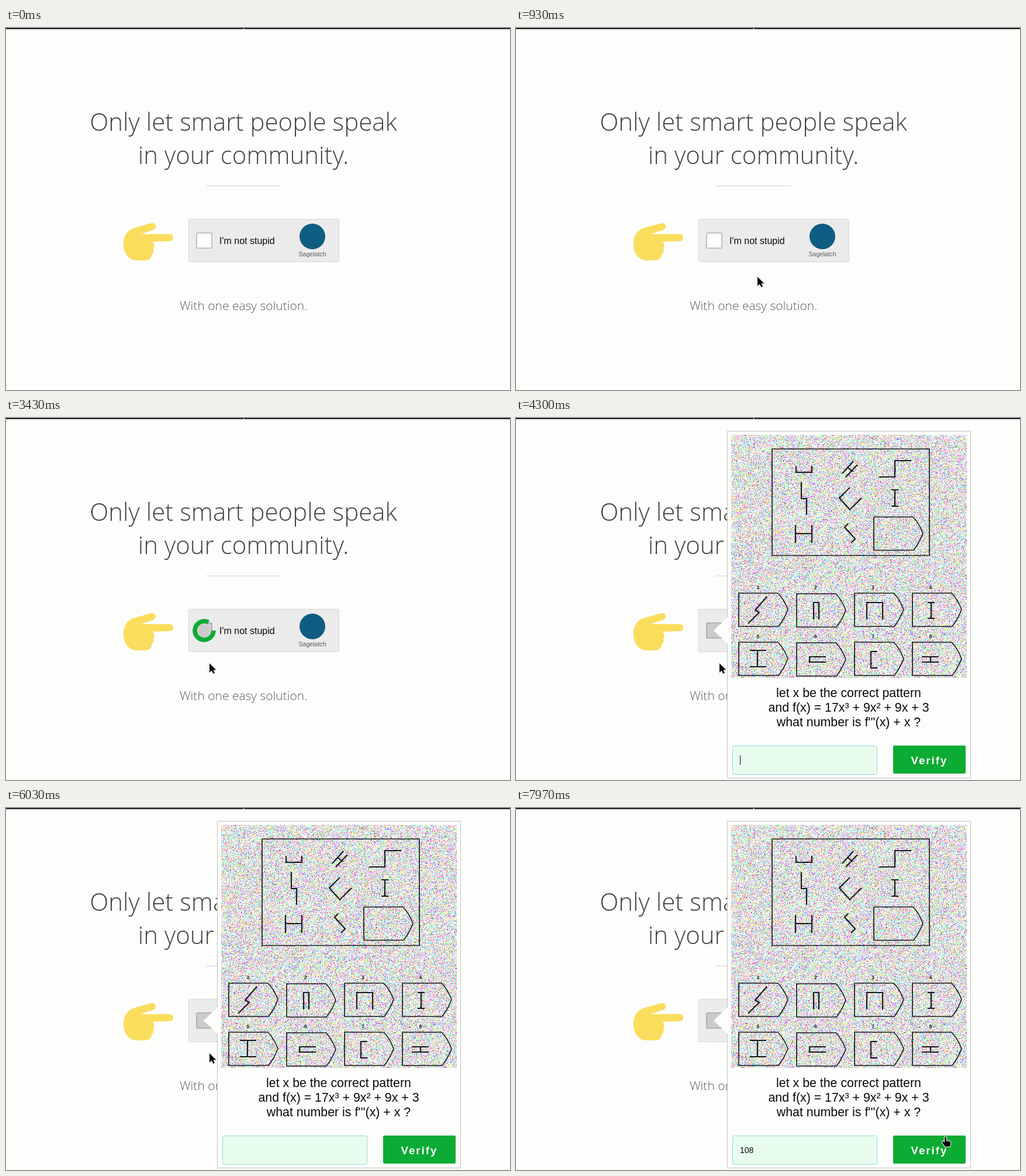
Animation of 862 by 620 pixels, one loop 8000 ms. Source, as an HTML page with a canvas:

```html
<!DOCTYPE html>
<html lang="en">
<head>
<meta charset="utf-8">
<title>Captcha demo</title>
<style>
  html, body { margin: 0; width: 100%; height: 100%; overflow: hidden; background: #fdfdfc; }
  canvas { display: block; }
</style>
</head>
<body>
<canvas id="stage" width="862" height="620"></canvas>
<script>
const ctx = document.getElementById('stage').getContext('2d');
const LOOP = 8000;
const CLICK = 2600, SPIN = 3050, POPUP = 3900, FOCUS = 4180;
const KEYS = [7000, 7160, 7340];
const ANSWER = '108';
const PAPER = '#fdfdfc', INK = '#0a0a0a', GREEN = '#0cab33';
const SANS = '"Liberation Sans", Arial, sans-serif';
const LIGHT = '"Open Sans", "Noto Sans", sans-serif';

// Pointer path: time, x, y
const PATH = [
  [300, 760, 640], [880, 413, 426], [1500, 413, 426], [2250, 339, 362],
  [2800, 339, 362], [3250, 348, 420], [7420, 348, 420], [7900, 734, 563]
];

const ease = p => p * p * (3 - 2 * p);
const clamp = p => Math.max(0, Math.min(1, p));

function pointerAt(t) {
  if (t < PATH[0][0]) return null;
  for (let i = 1; i < PATH.length; i++) {
    const [t0, x0, y0] = PATH[i - 1], [t1, x1, y1] = PATH[i];
    if (t < t1) {
      const p = ease((t - t0) / (t1 - t0));
      return [x0 + (x1 - x0) * p, y0 + (y1 - y0) * p];
    }
  }
  return PATH[PATH.length - 1].slice(1);
}

function text(str, x, y, font, color, align = 'left', spacing = 0) {
  ctx.font = font;
  ctx.fillStyle = color;
  ctx.textAlign = align;
  ctx.letterSpacing = spacing + 'px';
  ctx.fillText(str, x, y);
  ctx.letterSpacing = '0px';
}

function box(x, y, w, h, r, fill, stroke, line = 1) {
  ctx.beginPath();
  ctx.roundRect(x, y, w, h, r);
  ctx.fillStyle = fill;
  ctx.fill();
  if (stroke) {
    ctx.strokeStyle = stroke;
    ctx.lineWidth = line;
    ctx.stroke();
  }
}

const HAND = new Path2D(
  'M201 370 C201 353 210 344 224 341 C234 339 240 336 246 335 ' +
  'C252 333 256 335 256 340 C256 346 248 347 242 349 C237 351 233 352 230 353 ' +
  'H280 C288 353 288 365 280 365 L250 366 C255 370 254 376 252 378 ' +
  'C254 383 251 386 249 387 C250 391 247 394 245 396 C242 398 238 398 234 398 ' +
  'H224 C210 398 201 386 201 370 Z');

function drawHand() {
  ctx.fillStyle = '#fadd5c';
  ctx.fill(HAND);
}

function drawSpinner(t) {
  const turn = (t - 3430) / 1000 * Math.PI * 2;
  ctx.beginPath();
  ctx.arc(339, 364, 16, turn, turn + Math.PI * 1.65);
  ctx.strokeStyle = GREEN;
  ctx.lineWidth = 7.5;
  ctx.stroke();
}

function drawPage(t) {
  ctx.fillStyle = PAPER;
  ctx.fillRect(0, 0, 862, 620);
  ctx.fillStyle = '#222';
  ctx.fillRect(0, 0, 406, 2);
  ctx.fillRect(407, 0, 455, 2);

  const big = '300 42px ' + LIGHT;
  text('Only let smart people speak', 406, 176, big, '#444', 'center');
  text('in your community.', 406, 233, big, '#444', 'center');
  ctx.fillStyle = '#d3d3d3';
  ctx.fillRect(342, 270, 128, 1);
  text('With one easy solution.', 406, 483, '300 21px ' + LIGHT, '#5c5c5c', 'center');
  drawHand();

  box(312.5, 327.5, 257, 73, 2, '#ebebeb', '#d6d6d6');
  const pressed = t >= CLICK;
  box(326, 351, 26, 26, 2, pressed ? '#cbcbcb' : PAPER, pressed ? '#b2b2b2' : '#c1c1c1', 2);
  if (t >= SPIN && t < POPUP) drawSpinner(t);
  text("I'm not stupid", 365, 370, '16px ' + SANS, INK);
  ctx.beginPath();
  ctx.arc(524, 357, 22, 0, Math.PI * 2);
  ctx.fillStyle = '#0f5d82';
  ctx.fill();
  text('Sagelatch', 524, 391, '10.6px ' + SANS, '#5c5c5c', 'center');
}

// Colour grain behind the puzzle, seeded so that it stays still
function makeGrain(w, h) {
  const c = document.createElement('canvas');
  c.width = w;
  c.height = h;
  const g = c.getContext('2d');
  const img = g.createImageData(w, h);
  let seed = 7;
  const random = () => {
    seed = (seed + 0x6d2b79f5) | 0;
    let r = Math.imul(seed ^ seed >>> 15, 1 | seed);
    r ^= r + Math.imul(r ^ r >>> 7, 61 | r);
    return ((r ^ r >>> 14) >>> 0) / 4294967296;
  };
  const level = () => 255 - 230 * Math.max(0, random() - 0.7) / 0.3;
  for (let i = 0; i < w * h; i++) {
    img.data.set([level(), level(), level(), 255], i * 4);
  }
  g.putImageData(img, 0, 0);
  return c;
}

function makePuzzle() {
  const c = makeGrain(403, 416);
  const g = c.getContext('2d');
  g.translate(-368, -29);
  g.strokeStyle = g.fillStyle = '#1a1a1a';
  const tag = (x, y) =>
    `M${x} ${y} h67 q10 10 17 28 q-6 16 -16 29 h-68 z `;

  g.lineWidth = 1.7;
  g.stroke(new Path2D('M438 53 H707 V235.5 H438 Z ' + tag(612, 169.5)));
  for (let i = 0; i < 8; i++) {
    const col = i % 4, row = i >> 2;
    const x = 381 + col * 99, y = 300 + row * 84 + (col === 1 ? 1 : 0);
    g.stroke(new Path2D(tag(x, y)));
    g.font = 'bold 9px ' + SANS;
    g.textAlign = 'center';
    g.fillText(i + 1, 414 + col * 98.3, 293 + row * 84);
  }

  g.lineWidth = 2.2;
  g.stroke(new Path2D(
    'M479 82 V93 H506 V82 M558 95 L577 74 M564 101 L584 80 M566 84 L576 92 ' +
    'M621 101 H648 V73 H676 M488 110 V138 H497 V166 M571 119 L553 137 L571 157 L591 137 ' +
    'M642 123 H654 M648 123 V151 M642 151 H654 M478 183 V214 M506 183 V214 M478 198 H506 ' +
    'M568 181 L562 187 L580 207 L573 214'));
  g.stroke(new Path2D(
    'M429 306 L409 329 L416 333 L397 352 M509 345 V316 H518 V345 M600 345 V316 H627 V345 ' +
    'M704 316 H716 M710 316 V343 M704 343 H716 M400 398 H428 M413 398 V426 M400 426 H428 ' +
    'M530 409 H502 V418 H530 M618 400 H607 V428 H618 ' +
    'M694 409 H723 M694 418 H723 M709 409 V418'));
  return c;
}
const puzzle = makePuzzle();

function drawField(t) {
  box(370.5, 561.5, 247, 49, 3, '#e8fcee', '#8fdcd4');
  const typed = KEYS.filter(k => t >= k).length;
  const value = ANSWER.slice(0, typed);
  text(value, 383, 591, '14px ' + SANS, INK);
  const since = typed ? KEYS[typed - 1] : FOCUS;
  if (t >= since && (t - since) % 1200 < 600) {
    ctx.fillRect(Math.round(383 + ctx.measureText(value).width), 578, 1, 16);
  }
}

function drawPopup(t) {
  ctx.save();
  ctx.globalAlpha = clamp((t - POPUP) / 200);
  box(361.5, 22.5, 416, 594, 0, PAPER, '#c2c2c2');
  ctx.fillStyle = PAPER;
  ctx.fill(new Path2D('M363 340 L338 364 L363 388 Z'));
  ctx.drawImage(puzzle, 368, 29);
  ['let x be the correct pattern', 'and f(x) = 17x³ + 9x² + 9x + 3', "what number is f'''(x) + x ?"]
    .forEach((line, i) =>
      text(line, 569, 478 + i * 25, '21.33px ' + SANS, INK, 'center'));
  drawField(t);
  box(645, 561, 124, 48, 2, GREEN);
  text('Verify', 675.5, 593, 'bold 18.67px ' + SANS, '#fff', 'left', 2);
  ctx.restore();
}

const ARROW = new Path2D('M0 0 V16 L3.8 12.6 L6.4 18 L9 16.8 L6.5 11.5 H11.5 Z');
const FINGER = new Path2D(
  'M-1 1 Q0 -1 2 1 V7 L8 8 Q10 9 9 13 L8 17 H0 L-5 10 Q-6 7 -3 8 L-1 10 Z');

function drawPointer(t) {
  const at = pointerAt(t);
  if (!at) return;
  const [x, y] = at;
  const onButton = x > 645 && y > 561 && t > POPUP;
  const shape = onButton ? FINGER : ARROW;
  ctx.save();
  ctx.translate(x, y);
  ctx.lineJoin = 'round';
  ctx.lineWidth = 2;
  ctx.strokeStyle = '#fff';
  ctx.stroke(shape);
  ctx.fillStyle = INK;
  ctx.fill(shape);
  ctx.restore();
}

function frame() {
  const t = performance.now() % LOOP;
  drawPage(t);
  if (t >= POPUP) drawPopup(t);
  drawPointer(t);
  requestAnimationFrame(frame);
}
frame();
</script>
</body>
</html>
```
